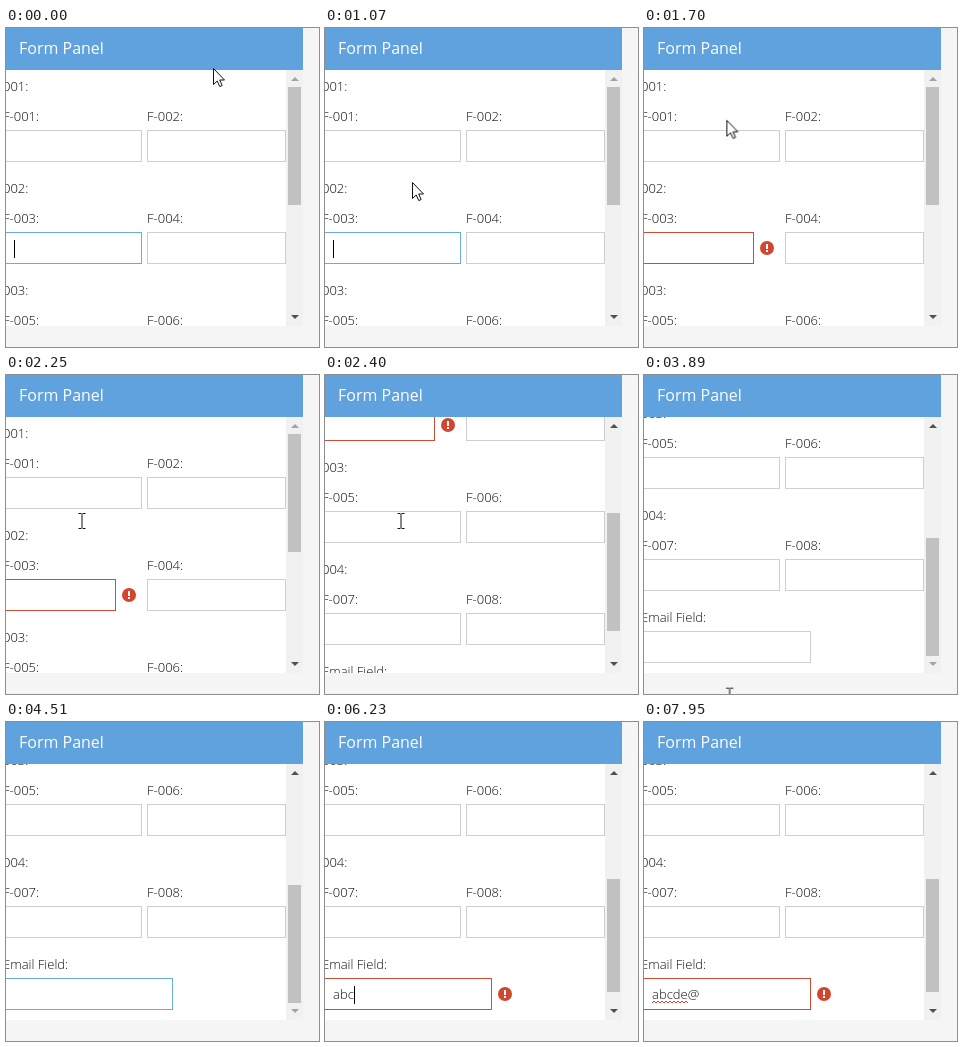
An HTML page that plays this animation: 313x319 px, repeating every 8 s.

```html
<!DOCTYPE html>
<html lang="en">
<head>
<meta charset="utf-8">
<title>Form Panel</title>
<style>
html, body { margin: 0; width: 100%; height: 100%; overflow: hidden; background: #f5f5f5; }
body { position: relative; font: 300 13px/20px "Open Sans", sans-serif; color: #111; }
div, svg, i { position: absolute; box-sizing: border-box; white-space: pre; }
.anim { animation: 8s step-end infinite; }

.head { left: 0; top: 0; width: 297px; height: 42px; background: #5fa2dd; }
.title { left: 13px; top: 10px; font-size: 16px; font-weight: 400; color: #fefefe; }
.view { left: 0; top: 42px; width: 280px; height: 256px; overflow: hidden; background: #fff; }
.page { left: 0; top: -42px; width: 280px; height: 540px; animation-name: scroll; }
.field { height: 32px; width: 139px; border: 1px solid #cecece; background: #fff; }
.third { animation-name: third; }
.mail { left: -3px; top: 480px; width: 170px; animation-name: mail; }
.text { left: 8px; top: 486px; }
.text::before { content: ""; animation: typing 8s step-end infinite; }
.caret { width: 1px; height: 18px; background: #000; }
.text .caret { top: 2px; animation-name: blink2; }
.first { left: 8px; top: 212px; animation-name: blink1; }
.icon { width: 14px; height: 14px; border-radius: 50%; background: #d2452f; }
.icon::before, .icon::after { content: ""; position: absolute; left: 6px; width: 2px; background: #fff; }
.icon::before { top: 3px; height: 5px; }
.icon::after { top: 9px; height: 2px; }
.icon1 { left: 116px; top: 213px; animation-name: icon1; }
.icon2 { left: 173px; top: 489px; animation-name: icon2; }
.wave { left: 8px; top: 502px; animation-name: wave; }

.bar { left: 280px; top: 42px; width: 17px; height: 256px; background: #f1f1f1; }
.thumb { left: 2px; top: 17px; width: 13px; height: 118px; background: #c1c1c1; animation-name: thumb; }
.up, .down { left: 5px; border: 4px solid transparent; border-top-width: 0; border-bottom: 4px solid #a3a3a3; }
.up { top: 7px; animation-name: up; }
.down { top: 245px; border-width: 4px 4px 0; border-color: #505050 transparent transparent; animation-name: down; }

.cursor { left: 0; top: 0; animation-name: move; }
.cursor svg { overflow: visible; }
.arrow { animation-name: arrow; }
.beam { animation-name: beam; }

@keyframes move {
  0% { transform: translate(200px, 20px); }
  3.7% { transform: translate(200px, 20px); animation-timing-function: steps(11, start); }
  14.3% { transform: translate(80px, 134px); }
  15.3% { transform: translate(80px, 134px); animation-timing-function: steps(9, start); }
  24% { transform: translate(74px, 54px); }
  26.1% { transform: translate(74px, 54px); animation-timing-function: steps(3, start); }
  29% { transform: translate(69px, 106px); }
  31.95% { transform: translate(68px, 122px); }
  34.8% { transform: translate(68px, 122px); animation-timing-function: steps(3, start); }
  37.8% { transform: translate(94px, 190px); animation-timing-function: steps(3, start); }
  40.7% { transform: translate(100px, 191px); }
  44.6% { transform: translate(100px, 191px); animation-timing-function: steps(2, start); }
  46.6% { transform: translate(80px, 284px); }
  48.6% { transform: translate(80px, 284px); animation-timing-function: steps(3, start); }
  51.4% { transform: translate(76px, 274px); }
  53.45% { transform: translate(154px, 244px); visibility: visible; }
  54.35%, 100% { transform: translate(154px, 244px); visibility: hidden; }
}
@keyframes arrow {
  0%, 18.2%, 31.95%, 44.6%, 53.45% { opacity: 1; }
  15.3%, 28%, 36.8%, 45.6%, 100% { opacity: 0; }
}
@keyframes beam {
  0%, 18.2%, 31.95%, 44.6%, 53.45%, 100% { opacity: 0; }
  15.3%, 28%, 36.8%, 45.6% { opacity: 1; }
}
@keyframes scroll {
  0% { transform: none; }
  29.1% { transform: translateY(-80px); }
  30% { transform: translateY(-170px); }
  31%, 100% { transform: translateY(-224px); }
}
@keyframes thumb {
  0% { top: 17px; height: 118px; }
  29.1% { top: 54px; height: 118px; }
  30% { top: 96px; height: 118px; }
  31% { top: 121px; height: 118px; }
  66.1%, 100% { top: 115px; height: 113px; }
}
@keyframes up {
  0% { border-bottom-color: #a3a3a3; }
  29.1%, 100% { border-bottom-color: #505050; }
}
@keyframes down {
  0%, 66.1%, 100% { border-top-color: #505050; }
  31% { border-top-color: #a3a3a3; }
}
@keyframes third {
  0% { width: 139px; border-color: #69acdf; }
  21.1%, 100% { width: 113px; border-color: #cf4c35; }
}
@keyframes mail {
  0% { border-color: #cecece; }
  49.6% { border-color: #69acdf; }
  66.1%, 100% { border-color: #cf4c35; }
}
@keyframes icon1 { 0% { opacity: 0; } 21.1%, 100% { opacity: 1; } }
@keyframes icon2 { 0% { opacity: 0; } 66.1%, 100% { opacity: 1; } }
@keyframes wave { 0% { opacity: 0; } 92.45%, 100% { opacity: 1; } }
@keyframes blink1 {
  0%, 12.4% { opacity: 1; }
  6.6%, 19.1%, 100% { opacity: 0; }
}
@keyframes blink2 {
  0%, 56.35%, 71.95%, 87.6%, 99.35%, 100% { opacity: 0; }
  49.6%, 62.2%, 74.95%, 92.45% { opacity: 1; }
}
@keyframes typing {
  0% { content: ""; }
  65.1% { content: "a"; }
  74.95% { content: "ab"; }
  77.85% { content: "abc"; }
  80.85% { content: "abcde"; }
  92.45%, 100% { content: "abcde@"; }
}
</style>
</head>
<body>
<div class="view">
  <div class="page anim" id="page">
    <div style="left:-3px;top:456px">Email Field:</div>
    <div class="field mail anim"></div>
    <div class="text"><i class="caret anim"></i></div>
    <svg class="wave anim" width="36" height="4"><path id="wave" fill="none" stroke="#e33" stroke-width="1"/></svg>
    <div class="icon icon1 anim"></div>
    <div class="icon icon2 anim"></div>
  </div>
</div>
<div class="head"><div class="title">Form Panel</div></div>
<div class="bar">
  <div class="up anim"></div>
  <div class="thumb anim"></div>
  <div class="down anim"></div>
</div>
<div class="cursor anim">
  <svg class="arrow anim" width="12" height="19"><path d="M.5.5V16.5L4.2 13 6.8 18.6 9.2 17.5 6.7 12H11.5Z" fill="#fff" stroke="#111"/></svg>
  <svg class="beam anim" width="8" height="16"><path d="M-3.5-7.5H-.5M.5-7.5H3.5M0-7V7M-3.5 7.5H-.5M.5 7.5H3.5" fill="none" stroke="#111"/></svg>
</div>
<script>
const page = document.getElementById('page');

function add(cls, left, top, text = '') {
  const el = document.createElement('div');
  el.className = cls;
  el.style.left = left + 'px';
  el.style.top = top + 'px';
  el.textContent = text;
  page.append(el);
}

for (let row = 0; row < 4; row++) {
  const y = row * 102;
  add('', -3, y + 48, `00${row + 1}:`);
  [-3, 141].forEach((x, col) => {
    add('', x, y + 78, `F-00${row * 2 + col + 1}:`);
    add(row === 1 && col === 0 ? 'field third anim' : 'field', x, y + 102);
  });
}
add('caret first anim', 8, 212);

let d = 'M0 3';
for (let x = 2; x <= 36; x += 2) d += `L${x} ${x % 4 ? 1 : 3}`;
document.getElementById('wave').setAttribute('d', d);
</script>
</body>
</html>
```
